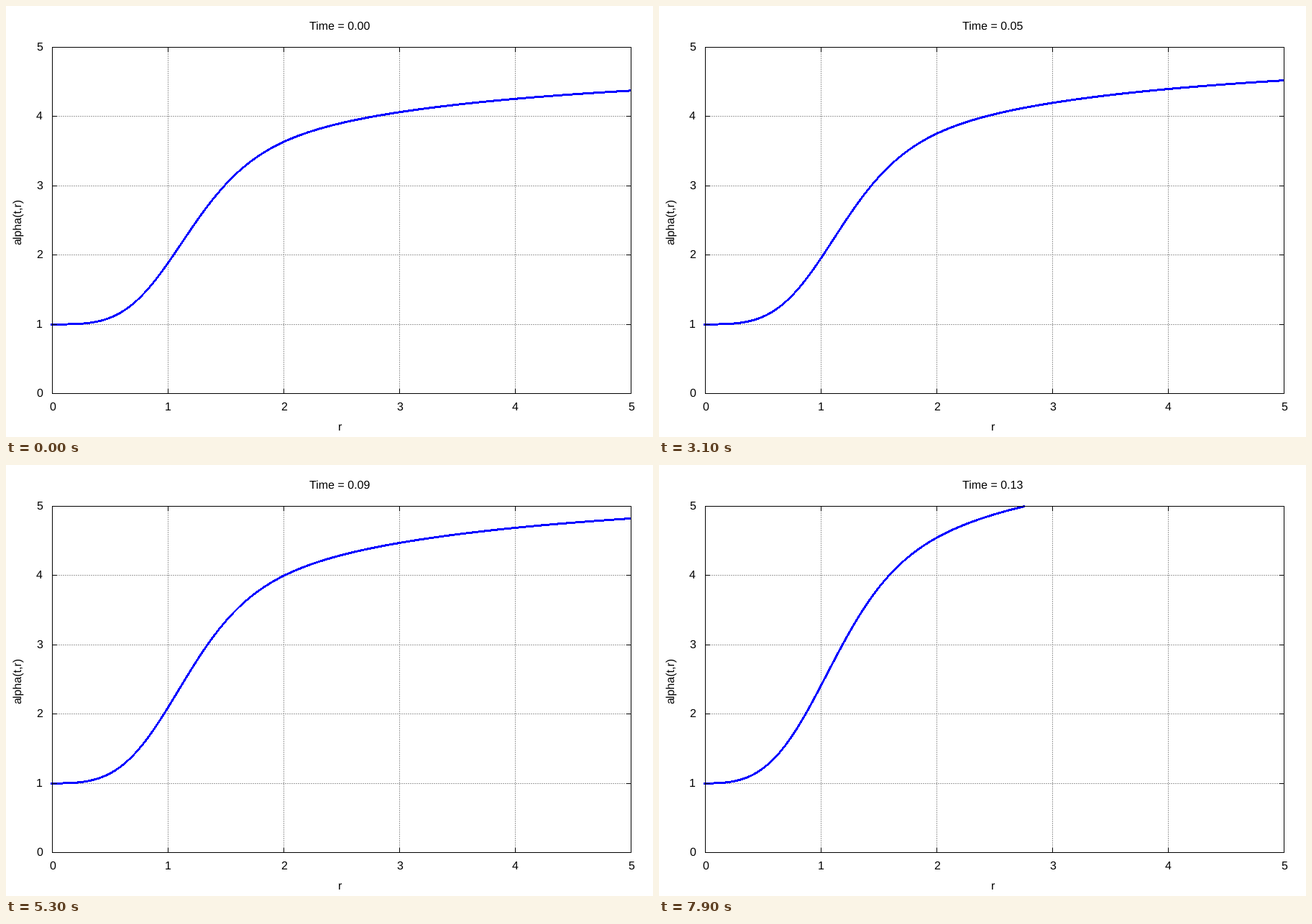
A matplotlib script for the animation above (8000 ms loop, 900 by 600 pixels).

```python
import numpy as np
import matplotlib.pyplot as plt
from matplotlib.animation import FuncAnimation
from matplotlib.patches import Polygon

W, H, DPI = 900, 600, 100
FRAMES, INTERVAL = 80, 100
DT = 0.00168
LEFT, RIGHT, TOP, BOTTOM = 64, 869, 57, 539
PX = 72 / DPI

plt.rcParams["font.family"] = "Liberation Sans"
plt.rcParams["font.size"] = 16 * PX
plt.rcParams["text.hinting"] = "no_hinting"


def sx(r):
    return LEFT + (RIGHT - LEFT) * r / 5


def sy(v):
    return BOTTOM - (BOTTOM - TOP) * v / 5


def first_alpha(r):
    """Flat core joined to a 1/r tail."""
    r = np.abs(r)
    tail = 3.874 - 2.548 / np.hypot(r, 1)
    return 1 + tail * (1 - (1 + .205 * r ** 3.3) ** -3)


def growth(r):
    """Total rise of alpha over the loop."""
    r = np.abs(r)
    tail = 1.3105 - .909 / np.hypot(r, 1.1)
    return tail * (1 - np.exp(-1.4 * r ** 2.5))


def ribbon(x, y):
    """Outline of a line two pixels thick along its minor axis."""
    dx, dy = np.gradient(x), np.gradient(y)
    k = np.maximum(np.abs(dx), np.abs(dy)) / (dx * dx + dy * dy)
    side = np.column_stack([-dy * k, dx * k])
    mid = np.column_stack([x, y])
    return np.vstack([mid + side, (mid - side)[::-1]])


# starts just left of the axis, like a line cap
radius = np.linspace(-.01, 5, 201)
start, gain = first_alpha(radius), growth(radius)

fig = plt.figure(figsize=(W / DPI, H / DPI), dpi=DPI, facecolor="white")
ax = fig.add_axes([0, 0, 1, 1])
ax.set_xlim(0, W)
ax.set_ylim(H, 0)
ax.axis("off")


def rule(x0, y0, x1, y1, color="black", z=3, **kw):
    """One-pixel line through pixel centres, horizontal or vertical."""
    if x0 == x1:
        xs, ys = [x0 + .5] * 2, [min(y0, y1), max(y0, y1) + 1]
    else:
        xs, ys = [min(x0, x1), max(x0, x1) + 1], [y0 + .5] * 2
    ax.plot(xs, ys, color=color, lw=PX, antialiased=False, snap=False,
            solid_capstyle="butt", dash_capstyle="butt", zorder=z, **kw)


for k in range(6):
    x, y = round(sx(k)), round(sy(k))
    if 0 < k < 5:
        dots = dict(color="#a0a0a0", z=1, ls=(0, (2, 2)))
        rule(x, TOP, x, BOTTOM, **dots)
        rule(LEFT, y, RIGHT, y, **dots)
    rule(x, TOP, x, TOP + 6)
    rule(x, BOTTOM, x, BOTTOM - 6)
    rule(LEFT, y, LEFT + 6, y)
    rule(RIGHT, y, RIGHT - 6, y)
    ax.text(x + .5, 563, str(k), ha="center", va="baseline")
    ax.text(51, y + 5, str(k), ha="right", va="baseline")

for x in (LEFT, RIGHT):
    rule(x, TOP, x, BOTTOM)
for y in (TOP, BOTTOM):
    rule(LEFT, y, RIGHT, y)

ax.text(464.5, 591, "r", ha="center", va="baseline")
ax.text(21, 299.5, "alpha(t,r)", rotation=90, rotation_mode="anchor",
        ha="center", va="baseline")
title = ax.text(422, 33, "", ha="left", va="baseline")
curve = ax.add_patch(Polygon(np.zeros((3, 2)), facecolor="#0000ff", lw=0,
                             antialiased=False, snap=False, zorder=2))


def update(i):
    q = (i / (FRAMES - 1)) ** 2
    v = start + gain * q * (.835 + .06 * q + .105 * q * q)
    # cut the curve where it leaves the top of the plot
    end = np.interp(5, v, radius)
    r = np.append(radius[radius < end], end)
    curve.set_xy(ribbon(sx(r) + .5, sy(np.interp(r, radius, v)) + .5))
    title.set_text(f"Time = {i * DT:.2f}")
    return curve, title


anim = FuncAnimation(fig, update, frames=FRAMES, interval=INTERVAL,
                     repeat=True, repeat_delay=0, blit=False)
plt.show()
```
